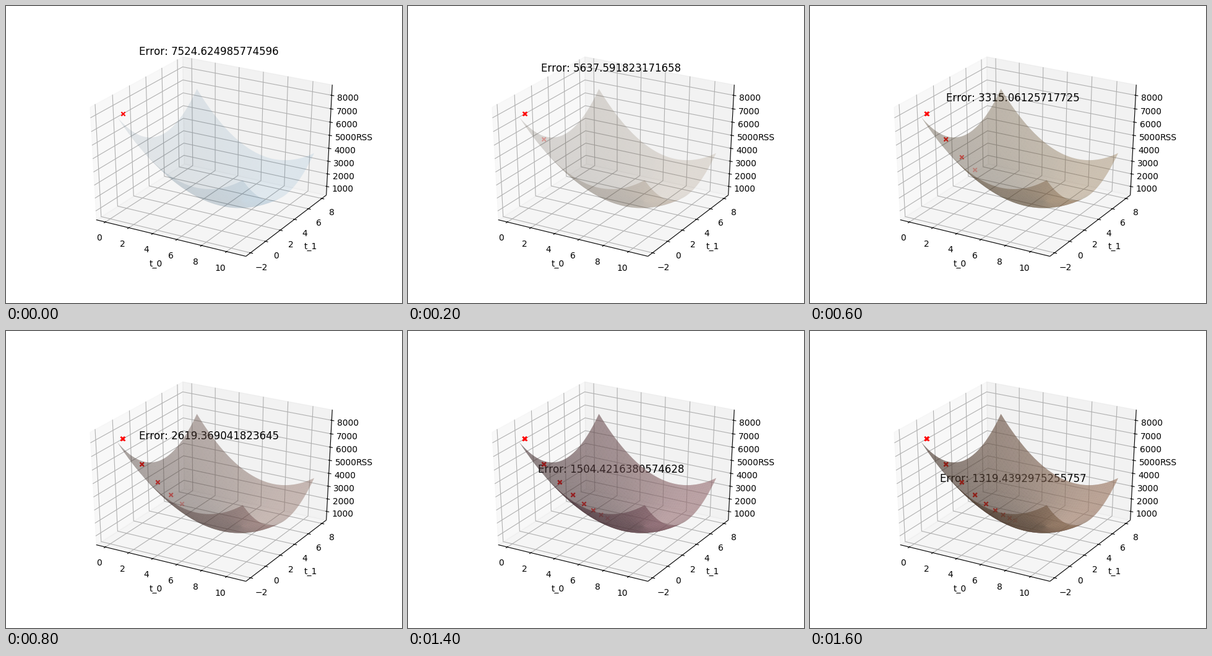
Write a matplotlib script that moves like this. It is 640 by 480 pixels and loops after 1.8 s.

```python
import numpy as np
import matplotlib.pyplot as plt
from matplotlib.animation import FuncAnimation
from matplotlib.collections import LineCollection, PolyCollection
from matplotlib.colors import to_rgb

W, H, DPI = 640, 480, 100
STEPS, STEP_MS = 9, 200

plt.rcParams["font.family"] = "DejaVu Sans"
plt.rcParams["text.kerning_factor"] = 6

# Axis limits (t_0, t_1, RSS) and the padded half-size of the unit box
LOW = np.array([-0.537, -2.37, 474.0])
SPAN = np.array([11.816, 10.82, 8134.0])
EDGE = 0.5 + 1 / 48

# Camera and plot area
ELEV, AZIM, DIST = np.radians(30), np.radians(-60), 10
VIEW = np.array([np.cos(AZIM) * np.cos(ELEV),
                 np.sin(AZIM) * np.cos(ELEV),
                 np.sin(ELEV)])
RIGHT = np.array([-np.sin(AZIM), np.cos(AZIM), 0])
UP = np.cross(VIEW, RIGHT)
LEFT, BOTTOM, AREA_W, AREA_H = 80, 427.2, 496, 369.6
SCALE_X, SCALE_Y = AREA_W / 0.185, AREA_H / 0.185

# Quadratic cost: START + Q x + R y + A x^2 + B y^2 + C x y
START, Q, R, A, B, C = 7524.625, -1435.2, -755.9, 100.0, 103.6, -5.26
RATE = 0.0007766

ERRORS = [7524.624985774596, 5637.591823171658, 4284.950483574183,
          3315.06125717725, 2619.3690418236453, 2120.1738566038093,
          1761.8037254918362, 1504.4216380574629, 1319.4392975255757]


def cost(x, y):
    return START + Q * x + R * y + A * x * x + B * y * y + C * x * y


def gradient(x, y):
    return Q + 2 * A * x + C * y, R + 2 * B * y + C * x


def project(points):
    """Centred box coordinates to pixels, plus distance from the eye."""
    p = np.asarray(points, float)
    depth = DIST - p @ VIEW
    px = LEFT + (0.095 + p @ RIGHT / depth) * SCALE_X
    py = BOTTOM - (0.095 + p @ UP / depth) * SCALE_Y
    return np.stack([px, py], axis=-1), depth


def to_box(x, y, z):
    return (np.stack([x, y, z], axis=-1) - LOW) / SPAN - 0.5


fig = plt.figure(figsize=(W / DPI, H / DPI), dpi=DPI, facecolor="white")
ax = fig.add_axes([0, 0, 1, 1])
ax.axis("off")


def draw_pane(axis, side, gray):
    others = [i for i in range(3) if i != axis]
    corners = np.full((4, 3), side * EDGE)
    corners[:, others] = EDGE * np.array([[-1, -1], [1, -1], [1, 1], [-1, 1]])
    color = (gray, gray, gray, 0.5)
    ax.add_collection(PolyCollection(
        [project(corners)[0]], facecolors=[color], edgecolors=[color],
        linewidths=1, zorder=-5))


def draw_axis(axis, ticks, name, corner, grid, tick_axis):
    """corner: signs of the axis edge; grid: signs along each grid line."""
    corner = np.array(corner, float)
    sign = np.where(np.arange(3) == axis, 0, corner)
    grid_lines, tick_lines = [], []
    for value in ticks:
        pos = (value - LOW[axis]) / SPAN[axis] - 0.5
        line = EDGE * np.array(grid, float)
        line[:, axis] = pos
        grid_lines.append(project(line)[0])

        base = EDGE * corner
        base[axis] = pos
        mark = np.array([base, base])
        mark[:, tick_axis] += corner[tick_axis] * np.array([0.2, -0.1]) / 12
        tick_lines.append(project(mark)[0])

        (px, py), _ = project(base + 0.0738 * sign)
        ax.text(px, py, str(value).replace("-", "\u2212"), fontsize=10,
                ha="center", va="top", zorder=-1)

    ends = np.array([corner, corner]) * EDGE
    ends[:, axis] = -EDGE, EDGE
    ax.add_collection(LineCollection(grid_lines, colors="#b0b0b0",
                                     linewidths=0.8, zorder=-4))
    ax.add_collection(LineCollection(tick_lines + [project(ends)[0]],
                                     colors="black", linewidths=0.8,
                                     zorder=-3))
    (px, py), _ = project(sign * (EDGE + 0.1605))
    ax.text(px, py, name, fontsize=10, ha="center", va="center", zorder=-1)


draw_pane(0, -1, 0.95)
draw_pane(1, 1, 0.90)
draw_pane(2, -1, 0.925)
draw_axis(0, range(0, 11, 2), "t_0", (0, -1, -1),
          [(0, -1, -1), (0, 1, -1), (0, 1, 1)], 1)
draw_axis(1, range(-2, 9, 2), "t_1", (1, 0, -1),
          [(1, 0, -1), (-1, 0, -1), (-1, 0, 1)], 0)
draw_axis(2, range(1000, 8001, 1000), "RSS", (1, 1, 0),
          [(-1, -1, 0), (-1, 1, 0), (1, 1, 0)], 0)


def build_mesh(cells=50):
    """Quads sorted far to near, with a brightness for each."""
    xs = np.linspace(0.89, 10.74, cells + 1)
    ys = np.linspace(-1.84, 7.96, cells + 1)
    gx, gy = np.meshgrid(xs, ys)
    pts, depth = project(to_box(gx, gy, cost(gx, gy)))

    def corners(grid):
        return np.stack([grid[:-1, :-1], grid[:-1, 1:],
                         grid[1:, 1:], grid[1:, :-1]], axis=2)

    quads = corners(pts).reshape(-1, 4, 2)
    order = np.argsort(-corners(depth).mean(axis=2).ravel())

    fx, fy = gradient(corners(gx).mean(axis=2), corners(gy).mean(axis=2))
    light = ((fx + fy + 0.5) / np.sqrt(fx ** 2 + fy ** 2 + 1)).ravel()
    light = 0.5 + 0.5 * (light - light.min()) / np.ptp(light)
    return quads[order], light[order]


def descend():
    x = y = 0.0
    path = []
    for _ in range(STEPS):
        path.append((x, y))
        dx, dy = gradient(x, y)
        x, y = x - RATE * dx, y - RATE * dy
    return np.array(path).T


quads, light = build_mesh()
path_x, path_y = descend()
spots, spot_depth = project(to_box(path_x, path_y, cost(path_x, path_y)))
far = -1 / spot_depth

# Every step adds one tinted sheet and marks the whole path again
sheets, marks = [], []
for k in range(STEPS):
    faces = np.full((len(quads), 4), 0.1)
    faces[:, :3] = light[:, None] * np.array(to_rgb(f"C{k}"))
    sheet = PolyCollection(quads, facecolors=faces, edgecolors="none",
                           linewidths=0, antialiaseds=True)
    ax.add_collection(sheet)
    sheets.append(sheet)

    z = far[:k + 1]
    reds = np.zeros((k + 1, 4))
    reds[:, 0] = 1
    reds[:, 3] = 1 - 0.7 * (z - z.min()) / (np.ptp(z) or 1)
    marks.append(ax.scatter(*spots[:k + 1].T, s=20, marker="x", c=reds,
                            linewidths=1.5))

ax.set_xlim(0, W)
ax.set_ylim(H, 0)
title = ax.text(LEFT + AREA_W / 2, 0, "", fontsize=12, ha="center",
                va="baseline", zorder=3.5)


def update(k):
    for j in range(STEPS):
        for artist, rank in ((marks[j], j), (sheets[j], k + 1 + j)):
            artist.set_visible(j <= k)
            artist.set_zorder(rank)
    title.set_text(f"Error: {ERRORS[k]}")
    title.set_y(BOTTOM - 8.33 - AREA_H * 0.92 ** (k + 1))
    return [*marks, *sheets, title]


anim = FuncAnimation(fig, update, frames=STEPS, interval=STEP_MS,
                     repeat=True, repeat_delay=0, blit=False)
plt.show()
```
